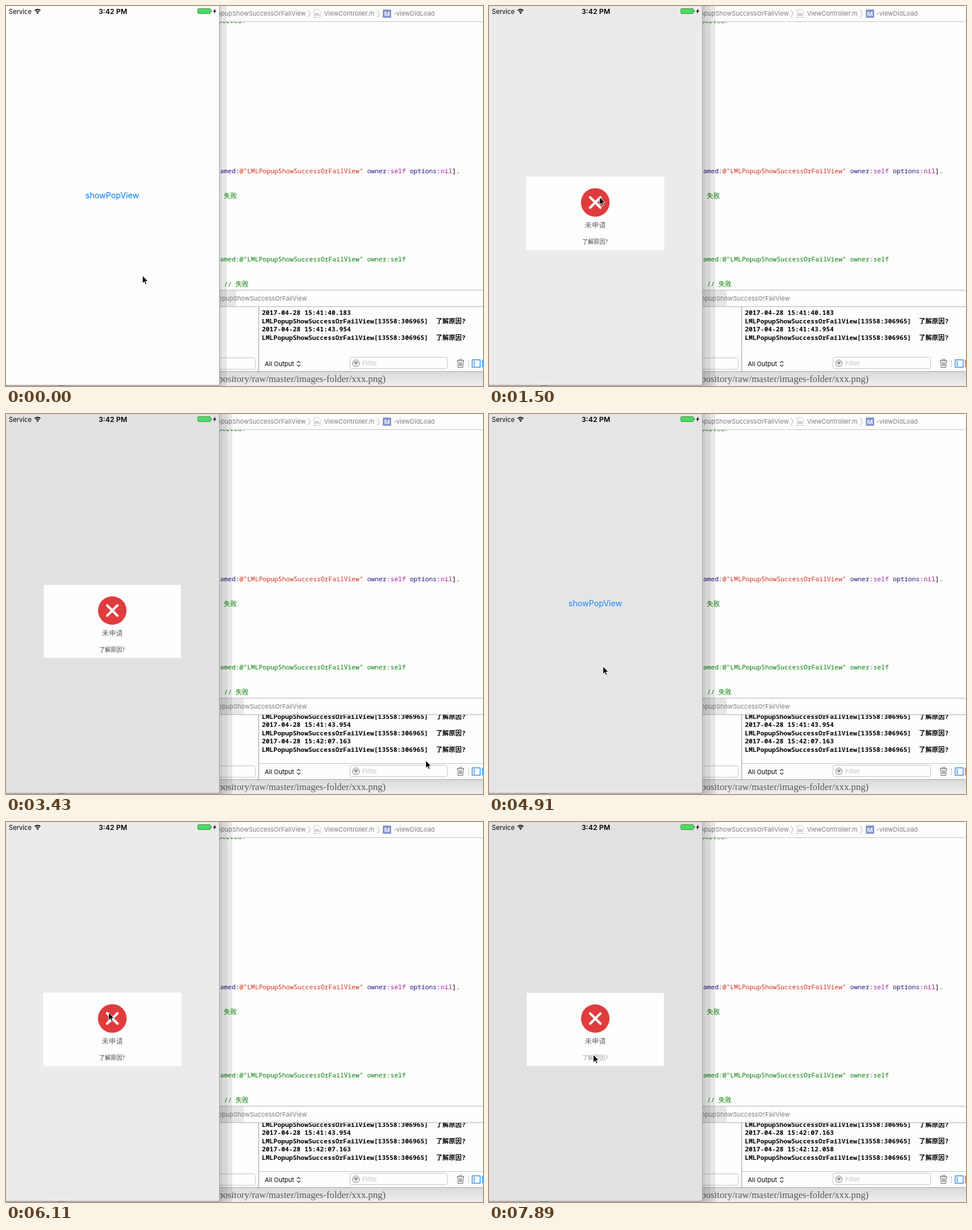
These frames come from a looping animation (837x668 px, 8 s). An HTML page:

```html
<!DOCTYPE html>
<html lang="en">
<head>
<meta charset="utf-8">
<title>Popup demo</title>
<style>
  html, body { margin: 0; width: 100%; height: 100%; overflow: hidden; background: #fefefe; }
  svg { display: block; width: 837px; height: 668px; }
  text { font-family: Inter, Roboto, sans-serif; font-size: 11px; white-space: pre; }
  .code { font-family: "Noto Sans Mono", "Noto Sans CJK SC", "Noto Sans CJK", monospace; font-size: 11.32px; }
  .log { font-weight: 700; }
  .cjk { font-family: "Noto Sans CJK SC", "Noto Sans CJK", sans-serif; }
  .comment { fill: #007d00; }
  .key { fill: #aa1899; }
  .str { fill: #d12f1b; }
  .call { fill: #2e0d7e; }
  .gray { fill: #7c7c7c; }
  .line { fill: none; stroke: #c4c4c4; }
  .mid { text-anchor: middle; }
  .end { text-anchor: end; }
</style>
</head>
<body>
<svg viewBox="0 0 837 668">
  <defs>
    <clipPath id="logClip"><rect x="444" y="529" width="393" height="85"/></clipPath>
    <clipPath id="editorClip"><rect x="374" y="28" width="463" height="471"/></clipPath>
    <linearGradient id="strip" x2="0" y2="1">
      <stop stop-color="#dadada"/><stop offset="1" stop-color="#efefef"/>
    </linearGradient>
  </defs>

  <rect width="837" height="668" fill="#fefefe"/>

  <!-- editor -->
  <g clip-path="url(#editorClip)">
    <text class="code comment" x="372.5" y="30">served.</text>
    <text class="code" x="369" y="294"><tspan class="call">Named:</tspan><tspan class="str">@"LMLPopupShowSuccessOrFailView"</tspan><tspan class="call"> owner:</tspan><tspan class="key">self</tspan><tspan class="call"> options:</tspan><tspan class="key">nil</tspan>].</text>
    <text class="code comment" x="362" y="338">// 失败</text>
    <text class="code comment" x="369" y="449">Named:@"LMLPopupShowSuccessOrFailView" owner:self</text>
    <text class="code comment" x="382.5" y="493">// 失败</text>
  </g>

  <!-- jump bar -->
  <path class="line" d="M374 27.5H837"/>
  <text class="gray end" x="526" y="17">LMLPopupShowSuccessOrFailView</text>
  <path class="line" d="M530 7l3.5 6.5l-3.5 6.5M652 7l3.5 6.5l-3.5 6.5" style="stroke:#aaa"/>
  <path d="M540.5 6.5h8l3 3v11h-11z" fill="#fff" stroke="#c8c8c8"/>
  <text class="gray mid" x="546" y="18" style="font-size:9px">m</text>
  <text class="gray" x="558" y="17">ViewController.m</text>
  <rect x="662" y="7" width="13" height="13" fill="#8195d3" stroke="#5a70b8"/>
  <text class="mid" x="668.5" y="17.5" fill="#fff" font-weight="600">M</text>
  <text class="gray" x="680" y="17">-viewDidLoad</text>

  <!-- debug area -->
  <rect id="tab" x="374" y="500" height="28" fill="#e7e7e7"/>
  <path class="line" d="M374 499.5H837M374 528.5H837" style="stroke:#b4b4b4"/>
  <text class="gray end" x="528" y="518">LMLPopupShowSuccessOrFailView</text>
  <path class="line" d="M443.5 529V642" style="stroke:#999"/>
  <g id="log" clip-path="url(#logClip)"></g>
  <path id="logEdge" class="line" d="M444 614.5H837"/>
  <rect class="line" x="340.5" y="618.5" width="97" height="20" rx="3"/>
  <text x="454" y="633">All Output</text>
  <path d="M510.5 627.5l3-3l3 3M510.5 630.5l3 3l3-3" fill="none" stroke="#333" stroke-width="1.2"/>
  <rect class="line" x="603.5" y="617.5" width="171" height="20" rx="3"/>
  <circle cx="614" cy="628" r="5.8" fill="none" stroke="#777"/>
  <path d="M610.5 626h7M611.5 628h5M613 630h2" stroke="#777" stroke-width="1.3"/>
  <text x="625" y="632" fill="#c2c2c2">Filter</text>
  <path d="M791 623.5h13M795 623v-2h5v2M792.5 624l1 11.5h8l1-11.5M795.5 626v7M797.5 626v7M799.5 626v7" fill="none" stroke="#666"/>
  <path class="line" d="M811.5 622v13"/>
  <g fill="none" stroke="#2f8cf0" stroke-width="1.4">
    <rect x="818" y="622" width="14" height="13"/>
    <path d="M821.5 624v9M836 622v13"/>
  </g>

  <!-- window behind -->
  <rect x="374" y="643" width="463" height="25" fill="url(#strip)"/>
  <path class="line" d="M374 642.5H837" style="stroke:#a8a8a8"/>
  <text class="end" x="666" y="661" fill="#555" style="font-family:'Liberation Serif',serif;font-size:16.6px">repository/raw/master/images-folder/xxx.png)</text>

  <!-- phone -->
  <g id="shadow">
    <rect x="375" height="668" opacity=".09"/>
    <rect x="375" height="668" opacity=".07"/>
    <rect x="375" height="668" opacity=".05"/>
  </g>
  <rect y="666" width="374" height="2" fill="#bdbdbd"/>
  <rect x="90" y="666" width="13" height="2" fill="#8b8b8b"/>
  <rect id="screen" width="374" height="666"/>
  <path d="M374.5 0V666.5H0" fill="none" stroke="#a0a0a0"/>
  <text x="5" y="13.5" style="font-size:11.2px">Service</text>
  <g fill="none" stroke="#000" stroke-width="1.7">
    <path d="M50.5 7.8a7 7 0 0 1 9.8 0M52.3 10.2a4.4 4.4 0 0 1 6.2 0"/>
    <circle cx="55.4" cy="12.2" r=".6"/>
  </g>
  <text class="mid" x="187.5" y="13.5" font-weight="600" style="font-size:12.3px">3:42 PM</text>
  <rect x="336.5" y="4.5" width="22.5" height="9" rx="1.8" fill="#4cd964" stroke="#2f8745" stroke-width=".8"/>
  <path d="M360 7.5q2 1.500 0 3z"/>
  <path d="M367.5 4.5l-4 5.2h2.3l-1.3 4l4.5-5.4h-2.5z"/>
  <text id="button" class="mid" x="186.5" y="338" fill="#007aff" style="font-size:14.2px">showPopView</text>

  <g id="popup">
    <rect x="66.2" y="300.5" width="240.6" height="128.3" fill="#fefefe"/>
    <circle cx="186.5" cy="345.5" r="25" fill="#e03c3d"/>
    <path d="M177.5 336.5l18 18m0-18l-18 18" stroke="#fff" stroke-width="4.4" stroke-linecap="round"/>
    <text class="cjk mid" x="186.5" y="390" fill="#666" style="font-size:12.2px">未申请</text>
    <text id="link" class="cjk mid" x="186" y="418" fill="#444" style="font-size:10px">了解原因?</text>
  </g>

  <path id="cursor" d="M.5 1V14.8L3.700 11.700L5.700 16.600L8 15.600L6 10.900H10.300Z" stroke="#fff"/>
</svg>

<script>
const LOOP = 8000;
const STEP = 148.7;
const OPENED = [1385, 5995];   // popup starts to appear
const CLOSED = 4842;
const CLICKED = [2840, 7740];  // link in the popup is released
const LINE = 14.6;

const home = { x: 239, y: 473 };
const moves = [
  { from: 0, to: 300, x: 405, y: 320 },
  { from: 300, to: 600, x: 145, y: 280 },
  { from: 600, to: 1050, x: 193.5, y: 335 },
  { from: 1650, to: 2250, x: 182.5, y: 409 },
  { from: 2850, to: 3400, x: 736, y: 608 },
  { from: 3600, to: 4600, x: 237, y: 441 },
  { from: 4750, to: 4900, x: 199.5, y: 443 },
  { from: 4900, to: 5050, x: 194.5, y: 371 },
  { from: 5050, to: 5500, x: 179.5, y: 334 },
  { from: 6100, to: 6700, x: 104, y: 483 },
  { from: 6850, to: 7450, x: 182.5, y: 408 }
];

const $ = id => document.getElementById(id);
const clamp = v => Math.min(1, Math.max(0, v));
const easeOut = p => 1 - (1 - p) ** 2;
const easeInOut = p => (1 - Math.cos(Math.PI * p)) / 2;
const show = (el, on) => el.setAttribute('visibility', on ? 'visible' : 'hidden');

const logLines = ['41:40.183', '41:43.954', '42:07.163', '42:12.058'].flatMap(stamp => [
  `2017-04-28 15:${stamp}`, 'LMLPopupShowSuccessOrFailView[13558:306965]  了解原因?'
]).map(line => {
  const el = document.createElementNS('http://www.w3.org/2000/svg', 'text');
  el.setAttribute('class', 'code log');
  el.setAttribute('x', 449);
  el.textContent = line;
  $('log').append(el);
  return el;
});

function drawCursor(t) {
  let { x, y } = home;
  for (const move of moves) {
    const p = easeInOut(clamp((t - move.from) / (move.to - move.from)));
    x += (move.x - x) * p;
    y += (move.y - y) * p;
  }
  $('cursor').setAttribute('transform', `translate(${x} ${y})`);
}

function drawPhone(t) {
  const opened = OPENED.findLast(time => time <= t);
  const closing = t >= CLOSED && t < OPENED[1];
  const open = opened !== undefined && !closing;
  const dim = open ? easeOut(clamp((t - opened) / 250))
    : closing ? 1 - easeInOut(clamp((t - CLOSED) / 280)) : 0;
  const grey = Math.round(254 - 29 * dim);
  $('screen').setAttribute('fill', `rgb(${grey},${grey},${grey})`);

  const pressed = OPENED.some(time => t < time && t > time - STEP);
  $('button').setAttribute('opacity', pressed ? .3 : 1 - .15 * dim);
  show($('button'), !open);

  const scale = 1 + .02 * (1 - dim);
  $('popup').setAttribute('transform', `translate(186.5 364.6) scale(${scale}) translate(-186.5 -364.6)`);
  show($('popup'), open);

  const click = CLICKED.findLast(time => time - STEP <= t);
  $('link').setAttribute('opacity', click ? Math.min(1, .3 + Math.max(0, t - click) / 600) : 1);
}

function drawDesktop(t) {
  const focused = t >= OPENED[0] - STEP;
  [...$('shadow').children].forEach((band, i) => {
    band.setAttribute('width', (focused ? 22 : 12) - 8.500 * i > 0 ? (focused ? 22 : 12) - 8.500 * i : 0);
  });
  $('tab').setAttribute('width', focused ? 43 : 30);

  // new entries scroll the log once it reaches the bottom
  const count = 4 + 2 * CLICKED.filter(time => time <= t).length;
  const bottom = Math.min(594, 543 + LINE * (count - 1));
  logLines.forEach((line, i) => {
    line.setAttribute('y', Math.round(bottom - LINE * (count - 1 - i)));
    show(line, i < count);
  });
  show($('logEdge'), count > 4);
}

const start = performance.now();
function tick() {
  const elapsed = (performance.now() - start) % LOOP;
  const t = Math.floor(elapsed / STEP) * STEP;
  drawCursor(t);
  drawPhone(t);
  drawDesktop(t);
  requestAnimationFrame(tick);
}
tick();
</script>
</body>
</html>
```
